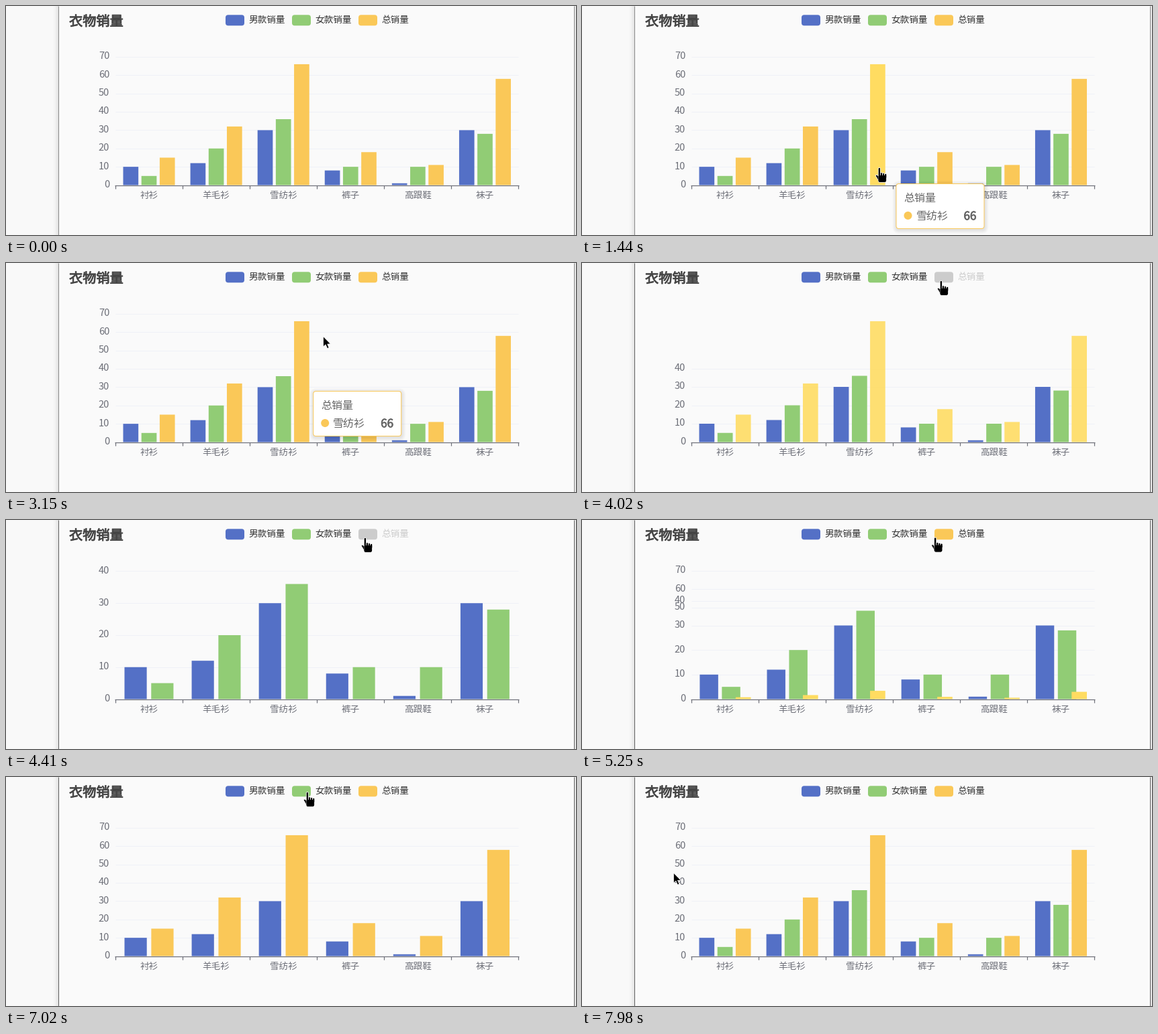
A matplotlib script for the animation above (8 s loop, 849x342 px).

```python
import numpy as np
import matplotlib.pyplot as plt
from matplotlib.animation import FuncAnimation
from matplotlib.patches import Circle, FancyBboxPatch, Polygon, Rectangle
from matplotlib.patheffects import withStroke
from matplotlib.transforms import Affine2D

W, H, DPI = 849, 342, 64
LOOP, FRAMES = 8000, 250
STEP = LOOP / FRAMES
PT = 72 / DPI
plt.rcParams["font.family"] = "Noto Sans CJK JP"

CATEGORIES = ["衬衫", "羊毛衫", "雪纺衫", "裤子", "高跟鞋", "袜子"]
SERIES = ["男款销量", "女款销量", "总销量"]
MEN = np.array([10, 12, 30, 8, 1, 30])
WOMEN = np.array([5, 20, 36, 10, 10, 28])
VALUES = [MEN, WOMEN, MEN + WOMEN]
COLORS = np.array([[84, 112, 198], [145, 204, 117], [250, 200, 88]]) / 255
BRIGHT = np.minimum(COLORS * 1.1, 1)
AXIS, GREY, DARK = "#6e7079", "#cccccc", "#333333"
X0, X1, BASE, TOP = 163, 763.5, 267.5, 76
BAND = (X1 - X0) / len(CATEGORIES)
LEGEND_X, LEGEND_STEP = 327, 99

# Legend clicks (time, toggled series) and pointer stops (arrive, leave, x, y)
CLICKS = [(3940, 2), (4990, 2), (5890, 1), (7000, 1)]
STOPS = [(600, 600, 448, 342), (1080, 1080, 440, 171), (1360, 1460, 443, 242),
         (1800, 1800, 438, 108), (2200, 2250, 406, 205), (2590, 2820, 385, 238),
         (3300, 3480, 505, 62), (3760, 5130, 535, 27), (5730, 7150, 449, 23),
         (7450, 7450, 365, 122), (7980, LOOP, 136, 143)]
APPEAR, FOCUS = STOPS[0][0], CLICKS[0][0]


def ease(p):
    p = min(max(p, 0), 1)
    return 4 * p ** 3 if p < 0.5 else 1 - 4 * (1 - p) ** 3


def mix(a, b, p):
    return a + (b - a) * p


def pointer(t):
    for (_, leave, x0, y0), (arrive, _, x1, y1) in zip(STOPS, STOPS[1:]):
        if t < arrive:
            p = np.clip((t - leave) / (arrive - leave), 0, 1)
            p = p * p * (3 - 2 * p)
            return mix(x0, x1, p), mix(y0, y1, p)
    return STOPS[-1][2:]


def axis_max(shown):
    return 10 * int(np.ceil(max(VALUES[s].max() for s in shown) / 10))


def build_states():
    """Visible series after each click, as (start, series)."""
    shown = {0, 1, 2}
    states = [(-LOOP, sorted(shown))] * 2
    for start, s in CLICKS:
        shown = shown ^ {s}
        states.append((start, sorted(shown)))
    return states


def slot(shown, s):
    """Offset inside a category band and width of a bar."""
    n = len(shown)
    share = 0.65 + 0.04 * n
    width = BAND * share / (n + 0.2 * (n - 1))
    return BAND * (1 - share) / 2 + shown.index(s) * width * 1.2, width


def level(value, top):
    return (BASE - TOP) * value / top


def find_hit(t):
    """Series and category under the pointer; a legend entry has no category."""
    x, y = pointer(t)
    if t < APPEAR:
        return None
    if 12 < y < 30:
        s, inside = divmod(x - LEGEND_X, LEGEND_STEP)
        return (int(s), None) if 0 <= s < 3 and inside < 89 else None
    i, inside = divmod(x - X0, BAND)
    if 0 <= i < len(CATEGORIES):
        for s in range(3):
            off, width = slot([0, 1, 2], s)
            if off <= inside <= off + width and 0 < BASE - y < level(VALUES[s][int(i)], 70):
                return s, int(i)
    return None


STATES = build_states()
HITS = [find_hit(n * STEP) for n in range(FRAMES)]
BAR_HITS = [n for n, hit in enumerate(HITS) if hit and hit[1] is not None]

fig = plt.figure(figsize=(W / DPI, H / DPI), dpi=DPI, facecolor="#f9f9f9")
ax = fig.add_axes([0, 0, 1, 1])
ax.axis("off")
ax.set_xlim(0, W)
ax.set_ylim(H, 0)


def label(x, y, s, size, color, ha="left", bold=False, **kw):
    effects = [withStroke(linewidth=size * 0.045 * PT, foreground=color)] if bold else None
    return ax.text(x, y + 0.37 * size, s, fontsize=size * PT, color=color, ha=ha,
                   va="baseline", path_effects=effects, **kw)


def box(x, y, w, h, radius, **kw):
    style = f"round,pad=0,rounding_size={radius}"
    return ax.add_patch(FancyBboxPatch((x, y), w, h, boxstyle=style, **kw))


def line(xs, ys, color, width=1, **kw):
    return ax.plot(xs, ys, color=color, lw=width * PT, solid_capstyle="butt", **kw)[0]


# Window frame
ax.add_patch(Rectangle((78, 0), 768, H, color="#fafafa", lw=0, zorder=0))
for i in range(9):
    ax.add_patch(Rectangle((69 + i, 0), 1, H, color="k", alpha=0.0011 * (i + 1) ** 2, lw=0))
ax.add_patch(Rectangle((847, 0), 2, H, color="#e6e6e6", lw=0))
edges = [line([x, x], [0, H], "#8c8c8c") for x in (78.5, 846.5)]

# Title and legend
label(94, 22, "衣物销量", 20.2, "#464646", bold=True)
swatches, names = [], []
for s, name in enumerate(SERIES):
    left = LEGEND_X + LEGEND_STEP * s
    swatches.append(box(left, 13.3, 28, 16, 4, lw=0))
    names.append(label(left + 34, 20, name, 13.6, DARK))

# Axes and bars
TICK_SIZE = 14.6
grid = [line([X0, X1], [0, 0], "#eff1f7", zorder=1) for _ in range(8)]
ticks = [label(154.2, 0, str(10 * i), TICK_SIZE, AXIS, "right", zorder=3) for i in range(8)]
line([X0 - 0.5, X1 + 0.5], [BASE, BASE], AXIS, 1.2, zorder=4)
for i in range(len(CATEGORIES) + 1):
    x = X0 + BAND * i
    line([x, x], [BASE, 273], AXIS, 1.2, zorder=4)
for i, name in enumerate(CATEGORIES):
    label(X0 + BAND * (i + 0.5), 282, name, 13.6, AXIS, "center", zorder=3)
bars = [[ax.add_patch(Rectangle((0, BASE), 1, 0, lw=0, zorder=2 + 0.1 * s, snap=False))
         for _ in CATEGORIES] for s in range(3)]

# Tooltip, relative to its top left corner
tip_shift = Affine2D()
tip_kw = dict(transform=tip_shift + ax.transData, zorder=6)
shadows = [box(1 - g, 2 - g, 131 + 2 * g, 67 + 2 * g, 4 + g, fc="k", lw=0, **tip_kw)
           for g in range(1, 7)]
tip_box = box(0.5, 0.5, 131, 67, 4, fc="white", lw=PT, **tip_kw)
tip_dot = ax.add_patch(Circle((18, 48), 6, lw=0, **tip_kw))
tip_title = label(12, 21.5, "", 16, "#666666", **tip_kw)
tip_name = label(30, 48, "", 16, "#666666", **tip_kw)
tip_value = label(120, 48, "", 17, "#666666", "right", True, **tip_kw)
tip_parts = [*shadows, tip_box, tip_dot, tip_title, tip_name, tip_value]

# Pointers, relative to their tips
cursor_shift = Affine2D()
cursor_kw = dict(transform=cursor_shift + ax.transData, fc="black")
outline = dict(cursor_kw, ec="white", lw=0.8 * PT, zorder=8)
arrow = ax.add_patch(Polygon([(0, 0), (0, 15.5), (3.5, 12.3), (6, 18), (8.6, 17),
                              (6.2, 11.5), (11, 11.3)], **outline))
hand = [ax.add_patch(Polygon([(-6, 11), (-4, 10), (0, 13), (0, 19), (-2, 18)], **outline)),
        box(-1.5, 11, 11.5, 10.5, 2, **outline)]
for i in range(4):
    top = 6 + 0.8 * i if i else -0.5
    hand.append(box(-1.8 + 3.1 * i, top, 3.3, 15 - top, 1.5, **outline))
hand.append(box(-1.6, 11, 11.7, 9.5, 2, lw=0, zorder=9, **cursor_kw))


def draw_chart(t, hit):
    k = max(i for i, state in enumerate(STATES) if state[0] <= t)
    start, shown = STATES[k]
    was_shown = STATES[k - 1][1]
    top, old_top = axis_max(shown), axis_max(was_shown)
    age = t - start
    p = ease(age / 500)

    for i, (rule, tick) in enumerate(zip(grid, ticks)):
        value = 10 * i
        rise = level(value, top)
        if value <= old_top:
            rise = mix(level(value, old_top), rise, p)
        y = BASE - rise
        rule.set_ydata([y, y])
        tick.set_y(y - 2 + 0.37 * TICK_SIZE)
        rule.set_visible(0 < value <= top)
        tick.set_visible(value <= top)

    for s in range(3):
        alpha = 1
        new, old = s in shown, s in was_shown
        end, begin = level(VALUES[s], top), level(VALUES[s], old_top)
        if new and old:
            off, width = (mix(a, b, p) for a, b in zip(slot(was_shown, s), slot(shown, s)))
            heights = mix(begin, end, p)
        elif new:
            off, width = slot(shown, s)
            heights = end * ease(age / 1000)
        else:
            off, width = slot(was_shown, s)
            heights = begin
            alpha = 1 - ease(age / 200)
        for i, bar in enumerate(bars[s]):
            lit = hit in ((s, i), (s, None))
            bar.set_bounds(X0 + BAND * i + off, BASE - heights[i], width, heights[i])
            bar.set_facecolor(BRIGHT[s] if lit else COLORS[s])
            bar.set_alpha(alpha)
        swatches[s].set_facecolor(COLORS[s] if new else GREY)
        names[s].set_color(DARK if new else GREY)


def draw_tooltip(frame):
    """Follow the hovered bar with a short lag, then fade out."""
    last = max((n for n in BAR_HITS if n <= frame), default=None)
    alpha = 0
    if last is not None:
        alpha = min((frame - BAR_HITS[0]) * STEP / 130, (300 - (frame - last) * STEP) / 200)
        alpha = np.clip(alpha, 0, 1)
    for part in tip_parts:
        part.set_visible(alpha > 0)
        part.set_alpha(alpha * (0.015 if part in shadows else 1))
    if alpha > 0:
        s, i = HITS[last]
        x, y = pointer(last * STEP - 45)
        tip_shift.clear().translate(x + 24.5, y + 23)
        tip_box.set_edgecolor(COLORS[s])
        tip_dot.set_facecolor(COLORS[s])
        tip_title.set_text(SERIES[s])
        tip_name.set_text(CATEGORIES[i])
        tip_value.set_text(str(VALUES[s][i]))


def update(frame):
    t = frame * STEP
    hit = HITS[frame]
    draw_chart(t, hit)
    draw_tooltip(frame)
    cursor_shift.clear().translate(*pointer(t))
    for part in hand:
        part.set_visible(hit is not None)
    arrow.set_visible(t >= APPEAR and hit is None)
    for edge in edges:
        edge.set_color("#8c8c8c" if t < FOCUS else "#626262")
    return []


anim = FuncAnimation(fig, update, frames=FRAMES, interval=STEP,
                     init_func=lambda: update(0), repeat=True, repeat_delay=0)
plt.show()
```
